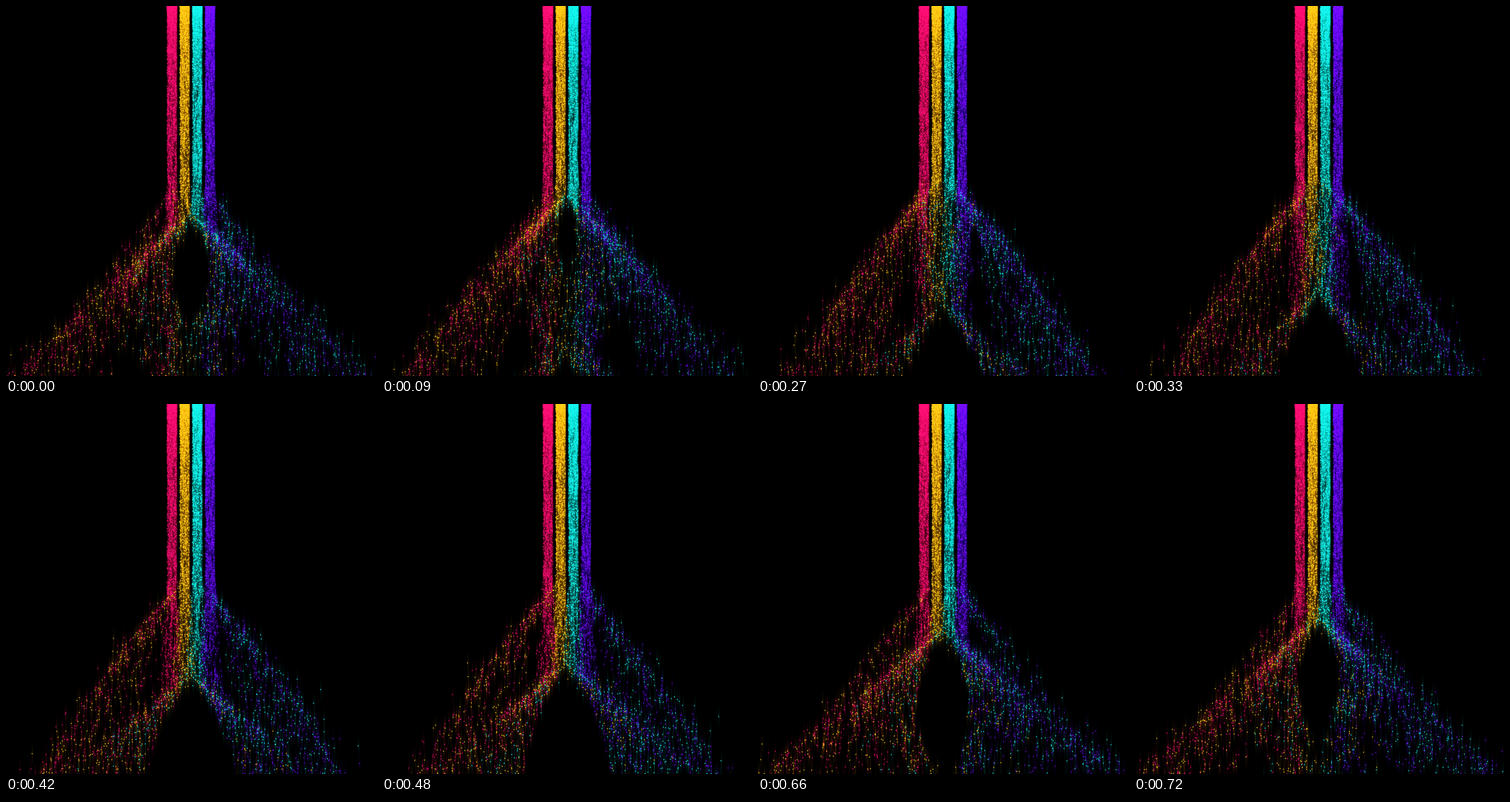
These frames come from a looping animation (540 px wide and 540 px high, 0.75 s). An HTML page with a canvas:

```html
<!DOCTYPE html>
<html lang="en">
<head>
<meta charset="utf-8">
<title>Split streams</title>
<style>
  html, body { margin: 0; width: 100%; height: 100%; overflow: hidden; background: #000; }
  canvas { display: block; width: 540px; height: 540px; }
</style>
</head>
<body>
<canvas id="stage" width="540" height="540"></canvas>
<script>
const SIZE = 540, CENTER = 269.75, LOOP = 750, STEP = 30, LIFE = 2 * LOOP;
const PAIRS = 1150;      // per stream; each pair is one drop and its twin half a life later
const STREAK = 40, DOT = 1.3;
const ctx = document.getElementById('stage').getContext('2d');

let seed = 20417;
function random() {
  seed = (seed + 0x6D2B79F5) | 0;
  let h = Math.imul(seed ^ (seed >>> 15), 1 | seed);
  h = (h + Math.imul(h ^ (h >>> 7), 61 | h)) ^ h;
  return ((h ^ (h >>> 14)) >>> 0) / 4294967296;
}
const clamp = v => Math.max(0, Math.min(1, v));
const mix = (a, b, k) => a + (b - a) * k;
const scatter = power => (2 * random() - 1) ** power;   // odd powers gather around zero

// Soft vertical glow behind every dot
function makeStreak(rgb) {
  const sprite = document.createElement('canvas');
  sprite.width = 3;
  sprite.height = STREAK;
  const g = sprite.getContext('2d');
  for (let y = 0; y < STREAK; y++) {
    const fade = (1 - Math.abs((y + 0.5) / STREAK * 2 - 1)) ** 1.3;
    [0.035, 0.12, 0.035].forEach((alpha, x) => {
      g.fillStyle = `rgba(${rgb},${alpha * fade})`;
      g.fillRect(x, y, 1, 1);
    });
  }
  return sprite;
}

function makeDrop(offset) {
  const side = Math.sign(offset), isInner = Math.abs(offset) < 15;
  const share = isInner ? 0.55 : 0.68;
  const strength = random() / share;   // below 1: follows the outer arm
  const swaps = isInner && strength > 1 && random() < 0.35;
  return {
    offset: offset + scatter(1) * 6.9,
    side: swaps ? -side : side,
    strength,
    start: random() * LOOP,
    spread: random(),
    width: 0.5 + random(),
    wobble: scatter(1) * 14,
    fuzz: scatter(5) * 24,
    stray: 1 + scatter(5) * 0.25
  };
}

const streams = [
  { offset: -27.75, glow: '255,0,110', dot: 'rgb(255,18,122)' },
  { offset: -9.25, glow: '255,165,0', dot: 'rgb(255,208,24)' },
  { offset: 9.25, glow: '0,225,215', dot: 'rgb(24,246,240)' },
  { offset: 27.75, glow: '100,0,255', dot: 'rgb(122,16,255)' }
].map(s => ({
  ...s,
  streak: makeStreak(s.glow),
  drops: Array.from({ length: PAIRS }, () => makeDrop(s.offset))
}));

// Sideways reach at height y caused by a splitter of the given age
function reach(drop, y, age) {
  const apex = Math.max(245, 495 - 0.272 * age);
  const d = y - apex - drop.fuzz;
  if (d <= 0) return 0;

  const young = 1.3 * d * d / (d + 20), old = 0.95 * d - 0.0007 * d * d;
  const outer = mix(young, old, clamp((age - 650) / 250));
  const hitAge = age - d / 0.8;
  if (drop.strength < Math.exp(-Math.max(0, hitAge - 750) / 420)) {
    return outer * (1 - Math.min(0.55, d / 260) * drop.spread ** 2) * drop.stray;
  }

  // Weak drops fill the space between the hollow and the outer arm
  const hollow = 210 * Math.exp((720 - age) / 320);
  const q = clamp(d / hollow);
  const inner = 0.6 * hollow * q * (1 - q) * clamp((1000 - age) / 200) * clamp(age / 200);
  const narrowing = mix(1, mix(1.25, 0.5, clamp(d / 250)), clamp((age - 600) / 200));
  const limit = Math.max(0, (1200 - age) * 0.19) * narrowing * drop.width;
  return mix(inner, Math.max(inner, Math.min(outer, limit)), drop.spread);
}

function dropX(drop, y, t) {
  let push = 0;
  if (y > 220) {
    for (let age = t - LOOP; age <= t + 2 * LOOP; age += LOOP) {
      push = Math.max(push, reach(drop, y, age));
    }
  }
  const own = drop.offset * drop.side + drop.wobble * clamp((y - 245) / 150);
  const pushed = push - 16 * Math.exp(-push / 15);
  return CENTER + drop.side * Math.max(own, pushed);
}

function draw(t) {
  ctx.fillStyle = '#000';
  ctx.fillRect(0, 0, SIZE, SIZE);

  const placed = streams.map(({ drops }) => drops.flatMap(drop => {
    const phase = (t + drop.start) % LOOP;
    return [phase, phase + LOOP].map(fall => {
      const y = 555 * (fall / LIFE) ** 2 - 3;
      return [dropX(drop, y, t), y];
    });
  }));

  streams.forEach(({ streak }, i) => {
    for (const [x, y] of placed[i]) {
      ctx.drawImage(streak, Math.round(x) - 1, Math.round(y) - STREAK / 2);
    }
  });
  streams.forEach(({ dot }, i) => {
    ctx.fillStyle = dot;
    for (const [x, y] of placed[i]) ctx.fillRect(x - DOT / 2, y - DOT / 2, DOT, DOT);
  });
}

const begin = performance.now();
let shown = -1;
function frame() {
  const elapsed = Math.max(0, performance.now() - begin) % LOOP;
  const t = Math.floor(elapsed / STEP) * STEP;
  if (t !== shown) {
    draw(t);
    shown = t;
  }
  requestAnimationFrame(frame);
}
frame();
</script>
</body>
</html>
```
